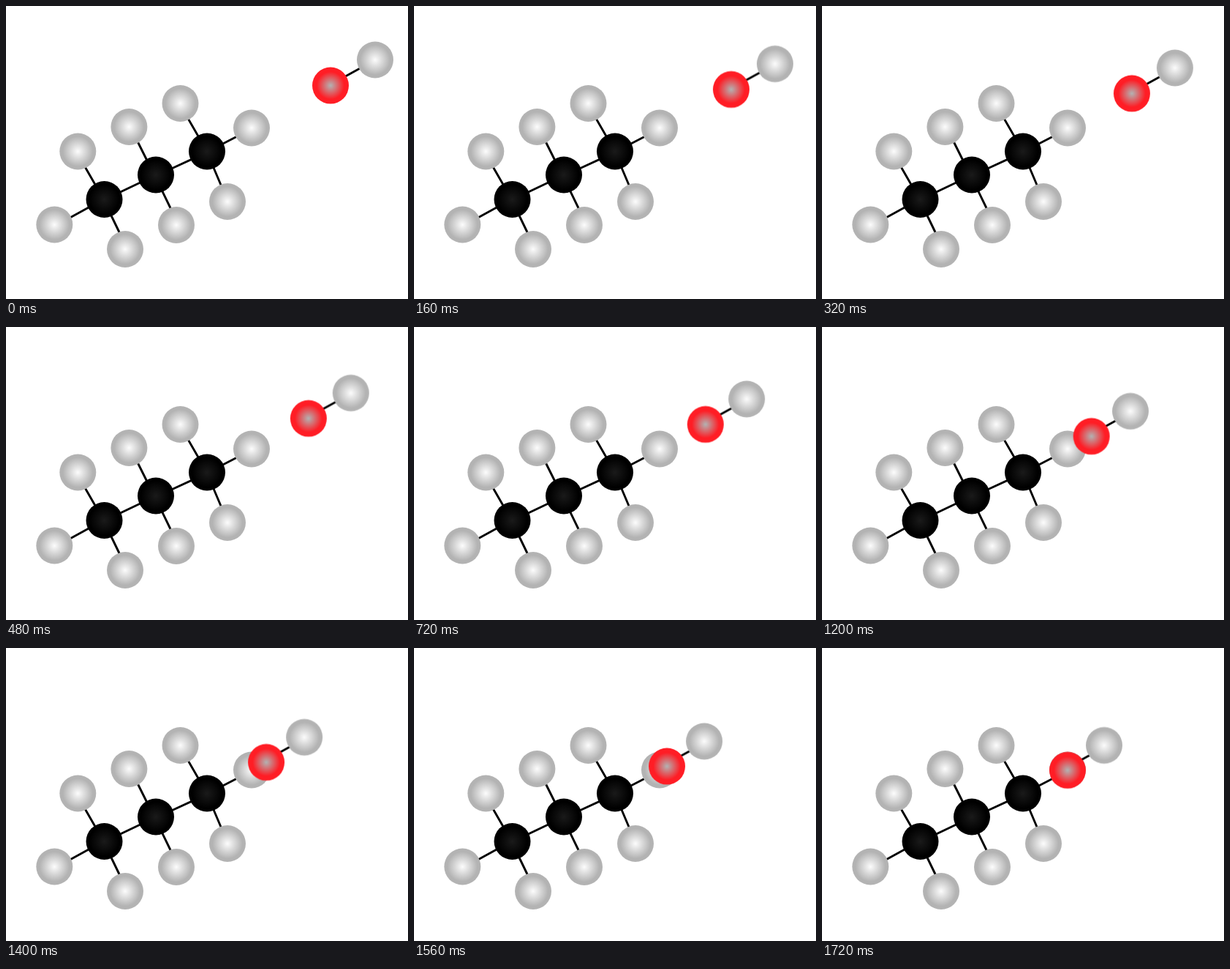
These frames come from a looping animation (550 by 400 pixels, 2160 ms). An HTML page:

```html
<!DOCTYPE html>
<html lang="en">
<head>
<meta charset="utf-8">
<title>Substitution on a carbon chain</title>
<style>
  html, body { margin: 0; width: 100%; height: 100%; overflow: hidden; background: #fff; }
  svg { display: block; width: 100%; height: 100%; }
  .bond { fill: none; stroke: #000; stroke-width: 2.9; }
  .hydrogen { fill: url(#gray); }
  .carbon { fill: url(#black); }
  .oxygen { fill: url(#red); }

  /* 43 steps of 40 ms, then a rest */
  .moving { animation: approach 2160ms steps(43, end) infinite; }
  @keyframes approach {
    79.629%, 100% { transform: translate(var(--dx), var(--dy)); }
  }
</style>
</head>
<body>
<svg viewBox="0 0 550 400">
  <defs>
    <radialGradient id="gray">
      <stop offset="0" stop-color="#fcfcfc"/>
      <stop offset=".82" stop-color="#b3b3b3"/>
    </radialGradient>
    <radialGradient id="black">
      <stop offset="0" stop-color="#1a1a1a"/>
      <stop offset=".82" stop-color="#000"/>
    </radialGradient>
    <radialGradient id="red">
      <stop offset="0" stop-color="#b3b3b3"/>
      <stop offset=".75" stop-color="#ff1d25"/>
    </radialGradient>
  </defs>

  <path class="bond" d="M106 216L125 249M178.5 182L195 215M247 150L266 183
    M83 291.5L119 271.8M141.5 281L157.5 314M211.5 248L227.5 281
    M282 216L296 249M291 191L321 175.5M150 257L190 238M221 224.5L261 206"/>

  <g class="hydrogen">
    <circle cx="98.3" cy="198.5" r="25"/>
    <circle cx="66.3" cy="298.5" r="25"/>
    <circle cx="163" cy="332" r="25"/>
    <circle cx="168.4" cy="165" r="25"/>
    <circle cx="233" cy="299" r="25"/>
    <circle cx="238.5" cy="133" r="25"/>
    <circle cx="303" cy="267" r="25"/>
    <circle cx="336" cy="166.5" r="25"/>
  </g>
  <g class="carbon">
    <circle cx="134.5" cy="264" r="25"/>
    <circle cx="205" cy="230.5" r="25"/>
    <circle cx="275" cy="198.5" r="25"/>
  </g>

  <path class="bond moving" style="--dx:-113.5px;--dy:58.8px" d="M459 99L489 82.5"/>
  <circle class="hydrogen moving" style="--dx:-119px;--dy:59.4px" cx="505" cy="73.5" r="25"/>
  <circle class="oxygen moving" style="--dx:-108px;--dy:58.3px" cx="444" cy="108.6" r="25"/>
</svg>
</body>
</html>
```
